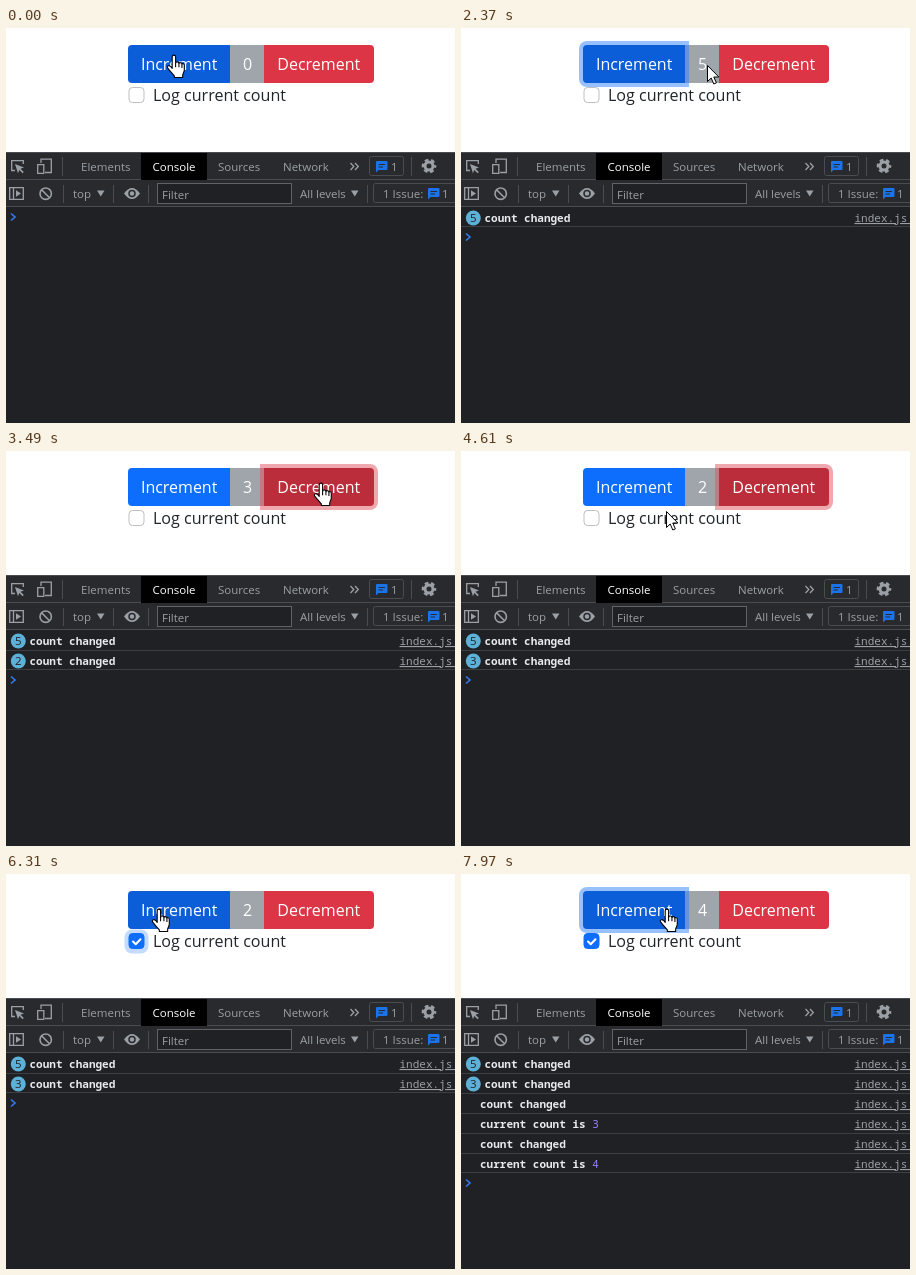
Recreate the animation shown at these times as an HTML page. Size 449 px wide and 395 px high, loop 8000 ms.

```html
<!DOCTYPE html>
<html lang="en">
<head>
<meta charset="utf-8">
<style>
  html, body { margin: 0; width: 100%; height: 100%; overflow: hidden; background: #fff; }
  svg { position: absolute; left: 0; top: 0; }
  .btn {
    position: absolute; top: 16.5px; height: 38px; color: #fff; text-align: center;
    font: 16px/39px "Open Sans", sans-serif;
  }
  #inc { left: 122.3px; width: 101.7px; border-radius: 4px 0 0 4px; }
  #count { left: 224px; width: 35px; background: #9fa5ab; }
  #dec { left: 258px; width: 109.5px; border-radius: 0 4px 4px 0; }
  .label { font: 16.1px "Open Sans", sans-serif; fill: #212529; }
  .ui { font: 11.5px "Open Sans", sans-serif; fill: #9aa0a6; }
  .mono { font: 11px "Noto Sans Mono", monospace; fill: #9aa0a6; }
  .msg { font-weight: 600; fill: #e8eaed; }
  .line { stroke: #494c50; fill: none; }
  .icon { stroke: #9aa0a6; fill: none; stroke-width: 1.3; }
  .solid { fill: #9aa0a6; }
</style>
</head>
<body>
<svg width="449" height="395">
  <defs>
    <g id="chat">
      <path fill="#1a73e8" d="M0 1q0-1 1-1h9.500q1 0 1 1v7q0 1-1 1H2.500L0 11.500z"/>
      <path stroke="#292a2d" d="M2.500 3.500h6.500M2.500 6h4.500"/>
    </g>
    <path id="down" class="solid" d="M0 0h7.500L3.750 6z"/>
  </defs>
  <text class="label" x="147" y="73">Log current count</text>
  <rect y="124" width="449" height="271" fill="#202124"/>
  <rect y="124" width="449" height="54" fill="#292a2d"/>
  <path class="line" d="M0 124.500H449M0 151.500H449M0 178.500H449M56.500 129V148M405.500 129V148M57.500 157V175M107.500 157V175M142.500 157V175M361.500 157V175"/>
  <rect x="135" y="125" width="66" height="27" fill="#000"/>

  <path class="icon" d="M9 142.500H5.700V132.700H17.300V136"/>
  <path class="solid" d="M9 136l9 3.500-3.500 1.300 3.300 3.300-1.200 1.200-3.300-3.300-1.300 3.300z"/>
  <path class="icon" d="M35 135V131.200H45.300V144.500H39M31.700 136.700H37.800V145.300H31.700z"/>
  <g class="ui">
    <text x="75" y="143">Elements</text>
    <text x="146.500" y="143" style="fill:#fff">Console</text>
    <text x="212" y="143">Sources</text>
    <text x="277" y="143">Network</text>
    <text x="385" y="143">1</text>
    <text x="67" y="170">top</text>
    <text x="294" y="170">All levels</text>
  </g>
  <path class="icon" d="M344.500 135l3.300 3.500-3.300 3.500M349 135l3.300 3.500-3.300 3.500"/>
  <rect class="line" x="363.500" y="128.500" width="34" height="19" rx="2"/>
  <use href="#chat" x="370" y="133"/>
  <circle class="icon" cx="423" cy="138" r="4" style="stroke-width:3"/>
  <circle class="icon" cx="423" cy="138" r="6" style="stroke-width:2.600" stroke-dasharray="3.600 2.683" stroke-dashoffset="1.800"/>

  <path class="icon" d="M3.700 159.700H17.300V171.300H3.700zM7.500 160V171"/>
  <path class="solid" d="M10 162.300l5 3.200-5 3.200z"/>
  <path class="icon" d="M35.300 161.500l8.500 8.500M34 165.700a5.700 5.700 0 1 0 11.400 0a5.700 5.700 0 1 0-11.400 0" style="stroke-width:1.600"/>
  <use href="#down" x="91" y="162.500"/>
  <path class="solid" d="M118 165.500q8-11 16 0q-8 11-16 0z"/>
  <circle cx="126" cy="165.500" r="3" fill="#9aa0a6" stroke="#292a2d" stroke-width="1.500"/>
  <rect x="151.500" y="155.500" width="134" height="20" fill="#202124" stroke="#5f6368"/>
  <text class="ui" x="156" y="171">Filter</text>
  <use href="#down" x="345" y="162.500"/>
  <rect class="line" x="367.500" y="155.500" width="90" height="19" rx="2"/>
  <text class="ui" x="377" y="170">1 Issue:</text>
  <use href="#chat" x="422" y="160"/>
  <text class="ui" x="436" y="170">1</text>
  <g id="console"></g>
  <g id="check"></g>
</svg>
<div class="btn" id="count"></div>
<div class="btn" id="inc">Increment</div>
<div class="btn" id="dec">Decrement</div>
<svg width="449" height="395" style="z-index:3">
  <g id="cursor" fill="#fff" stroke="#000" stroke-linejoin="round"></g>
</svg>

<script>
const LOOP = 8000;
const BLUE = "#0d6efd", BLUE_HOVER = "#0b5ed7", BLUE_DOWN = "#0a58ca";
const RED = "#dc3545", RED_HOVER = "#bb2d3b", RED_DOWN = "#b02a37";
const HAND = `<g transform="translate(-7.700 -.5) scale(1.070)">
  <path d="M5.500 13V2.200a1.600 1.600 0 0 1 3.200 0V8c.3-1.400 3-1.300 3.100.4 .4-1.200 2.700-1 2.800.6 .5-.9 2.200-.6 2.200 1v4.500c0 2-1.500 3.500-1.500 5V21.500H7.500V20C6 18 3 15 1.200 12.500 .3 11 2.300 9.600 3.800 11z"/>
  <path d="M8.700 8v4M11.800 8.400v3.600M14.600 9v3.500" fill="none"/></g>`;
const ARROW = `<path d="M.5.5V16.500L4.200 13l2.600 6 2.600-1.100L6.800 12h5z"/>`;

// Each step changes part of the state; log numbers are repeat counts, strings are logged values.
const steps = [
  [0, { n: 0, inc: BLUE_HOVER, dec: RED, focus: "", check: "off", log: [], x: 168, y: 27, hand: true }],
  [270, { inc: BLUE_DOWN, focus: "inc" }],
  [390, { inc: BLUE_HOVER, n: 1, log: [1] }],
  [670, { n: 2 }],
  [800, { log: [2] }],
  [950, { inc: BLUE_DOWN, n: 3, log: [3] }],
  [1080, { inc: BLUE_HOVER }],
  [1390, { inc: BLUE_DOWN, n: 4, log: [4] }],
  [1510, { inc: BLUE_HOVER }],
  [1790, { inc: BLUE_DOWN, n: 5, log: [5] }],
  [1940, { inc: BLUE_HOVER }],
  [2230, { x: 175 }],
  [2370, { x: 246, y: 37, hand: false }],
  [2500, { x: 268, y: 35, hand: true, dec: "#cc3140" }],
  [2650, { x: 315, y: 32, dec: RED_HOVER }],
  [2930, { inc: BLUE, dec: RED_DOWN, focus: "dec" }],
  [3060, { dec: RED_HOVER, n: 4, log: [5, 1] }],
  [3490, { n: 3, log: [5, 2] }],
  [4190, { n: 2, log: [5, 3] }],
  [4340, { x: 288, y: 38 }],
  [4460, { x: 251, y: 45, hand: false }],
  [4610, { x: 205, y: 60 }],
  [4740, { x: 187, y: 69 }],
  [4890, { x: 176, y: 71 }],
  [5010, { x: 173, y: 72 }],
  [5160, { x: 171, y: 72 }],
  [5730, { dec: "#d13343", focus: "", check: "down" }],
  [5880, { dec: RED, focus: "check", check: "on" }],
  [6190, { x: 160, y: 47, hand: true, inc: "#0c66ea" }],
  [6310, { x: 153, y: 35, inc: BLUE_HOVER }],
  [6590, { inc: BLUE_DOWN, focus: "inc" }],
  [6710, { n: 3, log: [5, 3, 1, "3"] }],
  [6830, { inc: BLUE_HOVER }],
  [7390, { n: 4, log: [5, 3, 1, "3", 1, "4"] }],
  [7970, { x: 206, y: 35 }],
];

const $ = id => document.getElementById(id);

function logRow(entry, i, log) {
  const y = 194 + 20 * i;
  const isLast = i === log.length - 1;
  const repeated = entry > 1 && typeof entry === "number";
  const badge = repeated
    ? `<circle cx="12.300" cy="${y - 4}" r="7.500" fill="#5db0d7"/>
       <text class="ui" x="12.300" y="${y}" text-anchor="middle" style="fill:#202124">${entry}</text>` : "";
  const message = typeof entry === "string"
    ? `current count is <tspan fill="#9980ff" font-weight="400">${entry}</tspan>` : "count changed";
  return `${badge}<text class="mono msg" x="${repeated ? 23.5 : 19}" y="${y}">${message}</text>
    <text class="mono" x="393.500" y="${y}" text-decoration="underline">index.js:</text>
    <path d="M0 ${y + (isLast ? 4.5 : 5.5)}H449" stroke="#3c4043"/>`;
}

function checkbox(check, focused) {
  const on = check === "on";
  const ring = focused ? `<rect x="118.500" y="55.500" width="24" height="24" rx="7.500" fill="#c2dbfe"/>` : "";
  const fill = on ? BLUE : check === "down" ? "#e6e6e6" : "#fff";
  const stroke = on ? BLUE : check === "down" ? "#acacac" : "#bfbfbf";
  const tick = on ? `<path d="M127 67.500l2.700 2.700 4.800-5" fill="none" stroke="#fff" stroke-width="2" stroke-linecap="round" stroke-linejoin="round"/>` : "";
  return `${ring}<rect x="123" y="59.500" width="15" height="15" rx="3.500" fill="${fill}" stroke="${stroke}"/>${tick}`;
}

function button(id, color, ring) {
  const { style } = $(id);
  style.background = color;
  style.boxShadow = ring ? `0 0 0 4px ${ring}` : "none";
  style.zIndex = ring ? 2 : 1;
}

function render(s) {
  button("inc", s.inc, s.focus === "inc" && "rgba(49,132,253,.5)");
  button("dec", s.dec, s.focus === "dec" && "rgba(225,83,97,.5)");
  $("count").textContent = s.n;
  $("check").innerHTML = checkbox(s.check, s.focus === "check");
  const promptY = 185.5 + 20 * s.log.length;
  $("console").innerHTML = s.log.map(logRow).join("") +
    `<path d="M5 ${promptY}l4 3.500-4 3.500" fill="none" stroke="#367cf1" stroke-width="1.600"/>`;
  $("cursor").innerHTML = s.hand ? HAND : ARROW;
  $("cursor").setAttribute("transform", `translate(${s.x} ${s.y})`);
}

let shown = 0;
function tick() {
  const t = performance.now() % LOOP;
  const past = steps.filter(([at]) => at <= t);
  if (past.length !== shown) {
    shown = past.length;
    render(Object.assign({}, ...past.map(([, change]) => change)));
  }
  requestAnimationFrame(tick);
}
tick();
</script>
</body>
</html>
```
